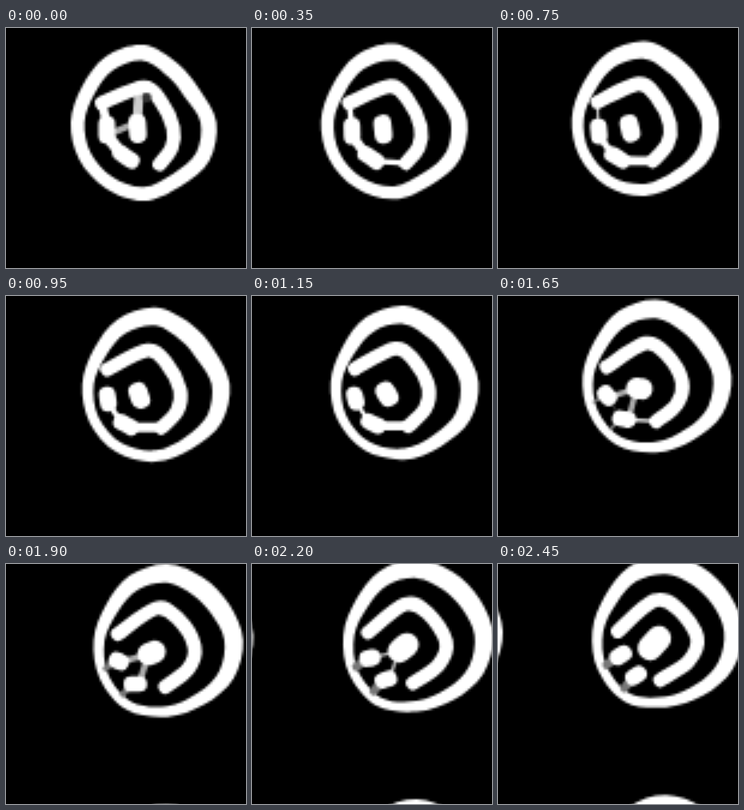
These frames come from a looping animation (300 by 300 pixels, 2.5 s). An HTML page with a canvas:

```html
<!DOCTYPE html>
<html lang="en">
<head>
<meta charset="utf-8">
<title>Drifting cell</title>
<style>
  html, body { margin: 0; width: 100%; height: 100%; overflow: hidden; background: #000; }
  canvas { display: block; width: 300px; height: 300px; }
</style>
</head>
<body>
<canvas id="stage" width="300" height="300"></canvas>
<script>
const SIZE = 300, GRID = 100, PAD = 150, LOOP = 2500, STEP = 50;

// Each part is a first and a last pose; everything between is blended.
const CENTRE = [[172, 118], [210, 84]];
const RADII = [   // every 30 degrees, clockwise from the right
  [91, 95, 92, 98, 95, 93, 91, 89, 95, 97, 85, 81],
  [96, 96, 93, 95, 102, 98, 92, 88, 93, 95, 92, 92]
];
const ARCH = [
  [[120, 94], [172, 74], [194, 92], [209, 125], [207, 150], [192, 170]],
  [[150, 84], [195, 46], [225, 56], [249, 92], [238, 122], [203, 145]]
];
const LEFT = [[[126, 120], [126, 134]], [[150, 116], [157, 112]]];
const BOTTOM = [[[143, 156], [157, 166]], [[169, 142], [176, 137]]];
const CORE = [[[164, 118], [165, 133]], [[190, 105], [201, 93]]];

const stage = document.getElementById('stage').getContext('2d');
const cell = document.createElement('canvas');
cell.width = cell.height = GRID * 2;
const pen = cell.getContext('2d');

const mix = (a, b, k) => Array.isArray(a) ? a.map((v, i) => mix(v, b[i], k)) : a + (b - a) * k;
const fade = (p, end) => Math.max(0, 1 - p / end);
const bump = (p, from, to) =>
  p < from || p > to ? 0 : Math.sin(Math.PI * (p - from) / (to - from));

function curve(pts, closed) {
  const n = pts.length;
  const get = i => closed ? pts[(i + n) % n] : pts[Math.max(0, Math.min(n - 1, i))];
  pen.moveTo(...pts[0]);
  for (let i = 0; i < (closed ? n : n - 1); i++) {
    const [a, b, c, d] = [get(i - 1), get(i), get(i + 1), get(i + 2)];
    pen.bezierCurveTo(
      b[0] + (c[0] - a[0]) / 6, b[1] + (c[1] - a[1]) / 6,
      c[0] - (d[0] - b[0]) / 6, c[1] - (d[1] - b[1]) / 6,
      c[0], c[1]);
  }
}

function stroke(pts, width, color = '#fff') {
  if (width < 0.5) return;
  pen.strokeStyle = color;
  pen.lineWidth = width;
  pen.beginPath();
  curve(pts, false);
  pen.stroke();
}

function drawRing(p, ease) {
  const cx = mix(CENTRE[0][0], CENTRE[1][0], p);
  const cy = mix(CENTRE[0][1], CENTRE[1][1], ease);
  const radii = mix(...RADII, p);
  const lean = 2 + 5 * Math.min(1, 2 * p);   // the wall thickens on the leading side
  const wall = a => 18.5 + lean * Math.cos(a + 0.8);
  const outline = inset => radii.map((r, i) => {
    const a = i * Math.PI / 6, d = r - inset(a);
    return [cx + d * Math.cos(a), cy + d * Math.sin(a)];
  });
  pen.fillStyle = '#fff';
  pen.beginPath();
  curve(outline(() => 0), true);
  curve(outline(wall), true);
  pen.fill('evenodd');
}

function drawCore(p, ease) {
  const sag = 5 * Math.sin(Math.PI * p);
  const pose = part => mix(...part, ease).map(([x, y]) => [x - sag, y + sag]);
  const arch = mix(...ARCH, ease);
  const left = pose(LEFT), bottom = pose(BOTTOM), core = pose(CORE);
  const tail = ([x, y], dx, dy) => [[x, y], [x + dx, y + dy]];

  // Faint links
  const ring = 11 * Math.max(0, Math.min(1, (p - 0.55) * 3));
  const late = bump(p, 0.47, 1), early = fade(p, 0.14);
  stroke(tail(left[0], -14, 10), ring, '#777');
  stroke(tail(bottom[0], -11, 13), ring, '#777');
  stroke([left[1], core[0]], 8 * (late + early), '#aaa');
  stroke([bottom[1], core[0]], 8 * late, '#aaa');
  stroke(tail(core[0], 2, -34), 12 * early, '#ccc');

  // Solid links
  stroke([left[0], arch[0]], 11 * fade(p, 0.4));
  stroke([left[1], bottom[0]], 15 * fade(p, 0.7));
  stroke([bottom[1], arch[arch.length - 1]], 12 * bump(p, 0, 0.75));

  stroke(arch, 17.5);
  stroke(left, 21);
  stroke(bottom, 20);
  stroke(core, mix(22, 31, ease));
  stroke(tail([176, 87], 0.1, 0), 12 * early, '#333');
}

function drawCell(p) {
  const ease = p ** 1.6;
  pen.setTransform(1, 0, 0, 1, 0, 0);
  pen.fillStyle = '#000';
  pen.fillRect(0, 0, cell.width, cell.height);
  const k = GRID / SIZE;
  pen.setTransform(k, 0, 0, k, PAD * k, PAD * k);
  pen.lineCap = pen.lineJoin = 'round';
  drawRing(p, ease);
  drawCore(p, ease);
}

function frame(now) {
  const t = Math.floor(now % LOOP / STEP) * STEP;
  drawCell(t / (LOOP - STEP));
  stage.globalCompositeOperation = 'source-over';
  stage.fillStyle = '#000';
  stage.fillRect(0, 0, SIZE, SIZE);
  // The field wraps at the edges.
  stage.globalCompositeOperation = 'lighten';
  for (const dx of [0, -SIZE]) {
    for (const dy of [0, SIZE]) {
      stage.drawImage(cell, dx - PAD, dy - PAD, SIZE * 2, SIZE * 2);
    }
  }
}

const start = performance.now();
function tick() {
  frame(performance.now() - start);
  requestAnimationFrame(tick);
}
tick();
</script>
</body>
</html>
```
